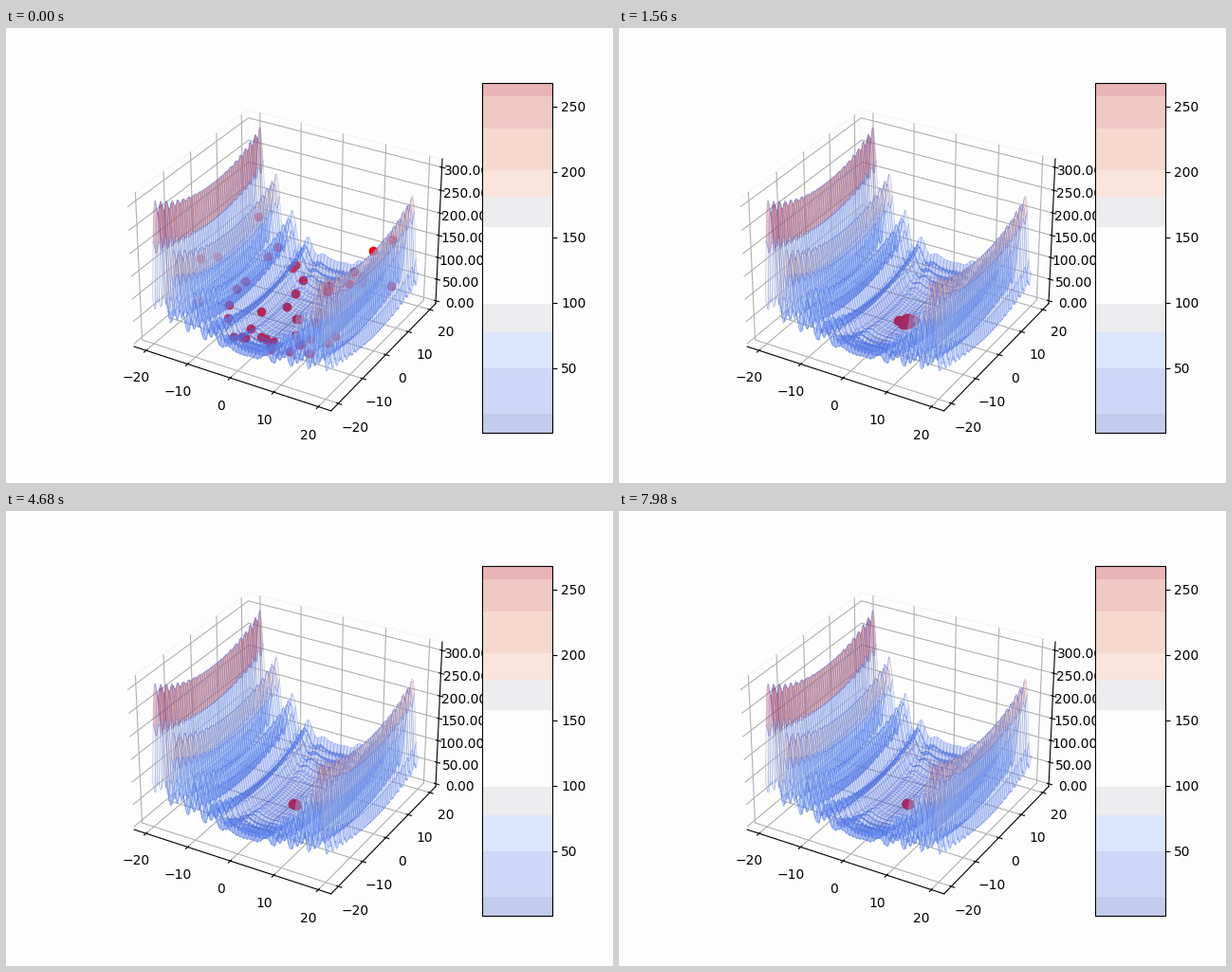
A matplotlib script for the animation above (8000 ms loop, 640 by 480 pixels).

```python
import matplotlib.pyplot as plt
import numpy as np
from matplotlib.animation import FuncAnimation
from matplotlib.lines import Line2D
from mpl_toolkits.mplot3d import proj3d

PAPER = "#fdfdfd"
INTERVAL, FRAMES, HOLD = 20, 400, 3  # a swarm step lasts three ticks
plt.rcParams.update({"figure.facecolor": PAPER, "axes.facecolor": PAPER})


def levy(x, y):
    u, v = 1 + (x - 1) / 4, 1 + (y - 1) / 4
    return (np.sin(np.pi * u) ** 2
            + (u - 1) ** 2 * (1 + 10 * np.sin(np.pi * u + 1) ** 2)
            + (v - 1) ** 2 * (1 + np.sin(2 * np.pi * v) ** 2))


def grab():
    fig.canvas.draw()
    return np.array(fig.canvas.buffer_rgba())


# Landscape with its colour scale
fig = plt.figure(figsize=(6.4, 4.8), dpi=100)
ax = fig.add_subplot(projection="3d")
axis = np.arange(-20, 20, 0.1)
X, Y = np.meshgrid(axis, axis)
surface = ax.plot_surface(X, Y, levy(X, Y), cmap="coolwarm", alpha=0.3,
                          edgecolor="royalblue", linewidth=0.5)
ax.zaxis.set_major_formatter("{x:.02f}")
for side in (ax.xaxis, ax.yaxis, ax.zaxis):
    side.set_pane_color(PAPER)
    side.pane.set_edgecolor("#f6f6f6")

bar = fig.colorbar(surface, aspect=5)
bar.solids.remove()
low, high = surface.get_clim()
levels = [low, 15, 50, 77, 99, 158, 181, 201.5, 233, 258, high]
shades = ["#c4ccec", "#ced7f5", "#dbe5fb", "#edecee", PAPER,
          "#edecee", "#fae4dc", "#f6d9cd", "#f0c8c4", "#e9b4b5"]
for bottom, top, shade in zip(levels, levels[1:], shades):
    bar.ax.axhspan(bottom, top, color=shade, lw=0)

# Render the still parts once: backdrop below the swarm, surface above it
surface.set_visible(False)
backdrop = grab()
camera, to_stage = ax.get_proj(), ax.transData.frozen()
surface.set_visible(True)
ax.set_axis_off()
ax.patch.set_visible(False)
bar.ax.set_visible(False)
fig.patch.set_alpha(0)
veil = grab()
fig.patch.set_alpha(1)
bar.ax.remove()
ax.remove()
fig.figimage(backdrop, zorder=1)
fig.figimage(veil, zorder=3)
dots = fig.add_artist(Line2D([], [], ls="", marker="o", ms=6, color="red",
                             transform=None, zorder=2))

# Swarm: damped swings around the minimum at (1, 1), plus a small lasting drift
COUNT = 50
rng = np.random.default_rng(7)
start = rng.uniform([-14, -18], [18, 18], (COUNT, 2)) - 1
swing = rng.uniform(0.05, 0.45, (COUNT, 2))
drift = np.array([1, 0.4]) * rng.uniform(0, 1, (COUNT, 1)) ** 3
pace = rng.uniform(0.7, 1.3, (COUNT, 2))
phase = rng.uniform(0, 2 * np.pi, (COUNT, 2))


def swarm(step):
    chase = start * np.exp(-step / 11) * np.cos(swing * step)
    stray = drift * np.exp(-step / 180) * np.sin(pace * step + phase)
    return (1 + chase + stray).T


def draw(i):
    x, y = swarm(i // HOLD)
    px, py, _ = proj3d.proj_transform(x, y, levy(x, y), camera)
    dots.set_data(*to_stage.transform(np.column_stack([px, py])).T)
    return [dots]


anim = FuncAnimation(fig, draw, frames=FRAMES, init_func=lambda: draw(0),
                     interval=INTERVAL, repeat=True, repeat_delay=0)
plt.show()
```
